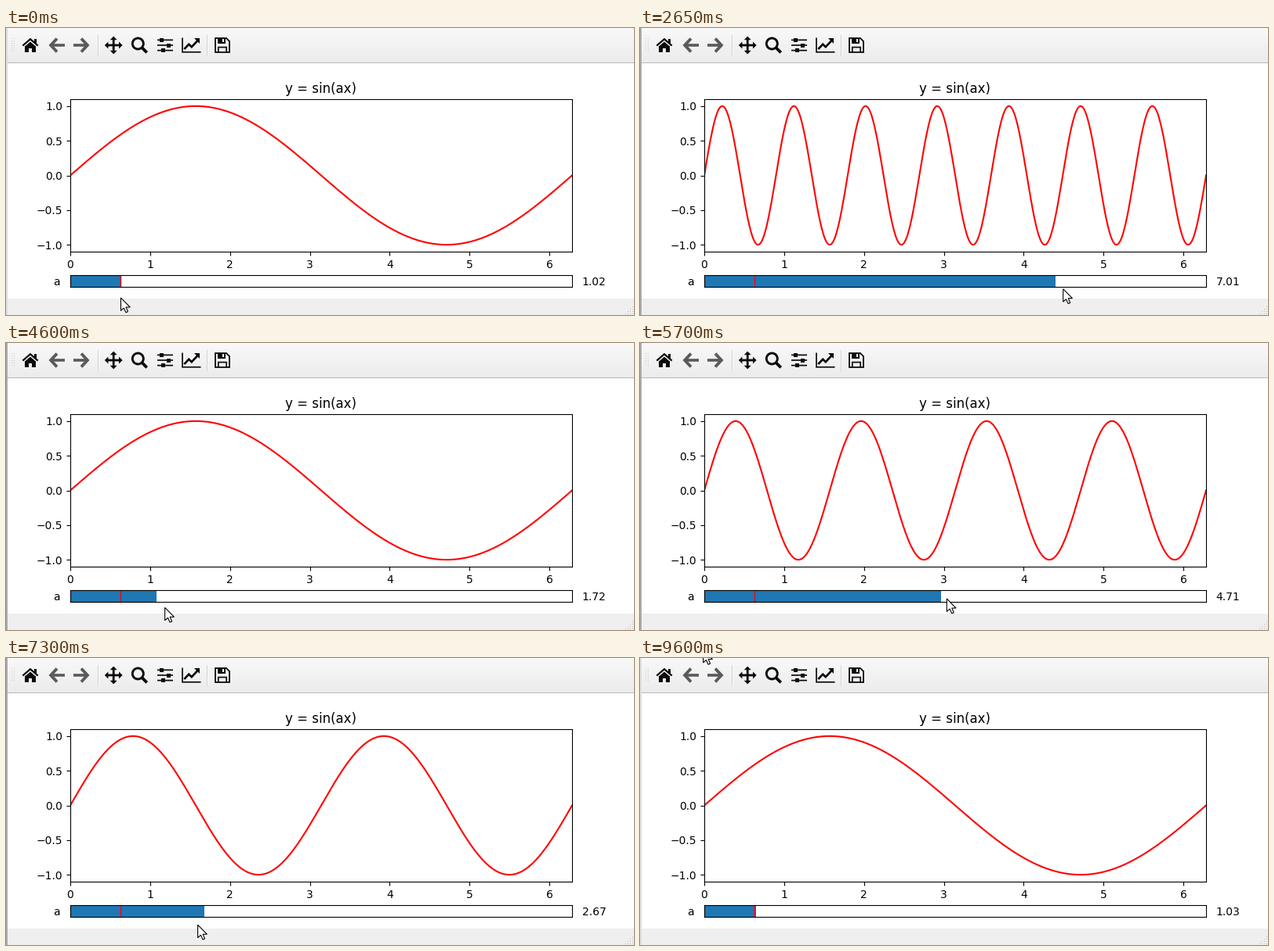
A matplotlib script that plays this animation: 801 px wide and 367 px high, repeating every 9700 ms.

```python
import math

import numpy as np
import matplotlib.pyplot as plt
from matplotlib.animation import FuncAnimation
from matplotlib.patches import Circle, Polygon, Rectangle

W, H, DPI = 801, 367, 100
STEP, LOOP = 50, 9700
PX = 72 / DPI  # points per pixel
INK, DIM = "#0a0a0a", "#5a5a5a"
LEFT, UNIT = 82, 64  # slider origin and pixels per unit of a

plt.rcParams["font.family"] = "DejaVu Sans"
fig = plt.figure(figsize=(W / DPI, H / DPI), dpi=DPI, facecolor="white")


def pixel_axes(zorder):
    """Axes over the whole window, in pixels with y pointing down."""
    ax = fig.add_axes([0, 0, 1, 1], zorder=zorder)
    ax.set(xlim=(0, W), ylim=(H, 0))
    ax.axis("off")
    ax.set_autoscale_on(False)
    return ax


def box_axes(bottom, height):
    return fig.add_axes([LEFT / W, bottom / H, 10 * UNIT / W, height / H])


back = pixel_axes(-1)
front = pixel_axes(10)


def rect(x, y, w, h, color=INK):
    return back.add_patch(Rectangle((x, y), w, h, fc=color, lw=0))


def line(points, width, color=INK):
    x, y = zip(*points)
    back.plot(x, y, color=color, lw=width * PX, solid_capstyle="butt",
              solid_joinstyle="miter", snap=False)


def poly(points, color=INK):
    back.add_patch(Polygon(points, fc=color, lw=0))


# --- window frame -----------------------------------------------------------
shade = np.linspace(0.975, 0.925, 44)[:, None, None] * np.ones((1, 1, 3))
back.imshow(shade, extent=(0, W, 44, 0), aspect="auto",
            interpolation="nearest", zorder=0)
back.set(xlim=(0, W), ylim=(H, 0))
rect(0, 44, W, 1, "#b8b8b8")
rect(0, 346, W, 21, "#efefef")
border = rect(0, 0, 2, H)

for i in range(12):
    rect(7 + 3 * (i % 2), 13 + 3 * (i // 2), 1, 1, "#c4c4c4")
for x in (117, 256):
    rect(x, 9, 1, 27, "#d2d2d2")
    rect(x + 1, 9, 1, 27, "#fafafa")
for row in range(4):
    for col in range(row + 1):
        rect(799 - 3 * col, 356 + 3 * row, 1, 1, "#b8b8b8")

# --- toolbar icons, centred on one row --------------------------------------
MID = 22


def home(x):
    line([(x - 9.7, 22.6), (x, 14.2), (x + 9.7, 22.6)], 2.2)
    rect(x + 5, 13.5, 2.6, 6)
    poly([(x - 6.7, 23.4), (x, 17.6), (x + 6.7, 23.4)])
    for side in (x - 6.7, x + 2):
        rect(side, 23.2, 4.7, 7.8)
    rect(x - 3, 22.5, 6, 3)


def arrow(tip, way):
    wing = tip + way * 10.5
    line([(wing, MID - 8.5), (tip + way * 2.6, MID), (wing, MID + 8.5)], 3.8, DIM)
    line([(tip + way * 3, MID), (tip + way * 20.5, MID)], 3.6, DIM)


def move(x):
    for k in range(4):
        c, s = round(math.cos(k * math.pi / 2)), round(math.sin(k * math.pi / 2))
        line([(x, MID), (x + 8 * c, MID + 8 * s)], 2.8)
        poly([(x + r * c - w * s, MID + r * s + w * c)
              for r, w in ((11.4, 0), (6.8, 4.5), (6.8, -4.5))])


def zoom(x):
    back.add_patch(Circle((x, 20), 7, fill=False, ec=INK, lw=2.9 * PX))
    line([(x + 4.7, 24.7), (x + 11.4, 31.4)], 3.8)


def sliders(x):
    for k, knob in enumerate((-4.2, 4.2, -2.5)):
        y = MID + 6.65 * (k - 1)
        line([(x - 10, y), (x + 10, y)], 1.7)
        rect(x + knob - 2.4, y - 2.5, 4.8, 5)


def chart(x):
    line([(x, 12.5), (x, 30.8), (x + 23.5, 30.8)], 1.7)
    line([(x + 2.3, 27), (x + 8.2, 20.8), (x + 11.8, 24.2), (x + 19.5, 16)], 2.7)
    poly([(x + 15.3, 13.2), (x + 21.8, 13.2), (x + 21.8, 19.7)])


def save(x):
    line([(x, MID), (x, 13), (x + 14, 13), (x + 18, 17), (x + 18, 31), (x, 31),
          (x, MID)], 1.8)
    rect(x + 3, 13, 9.5, 6.5)
    rect(x + 8.5, 14.2, 2.2, 4, "#f0f0f0")
    line([(x + 3.8, 31), (x + 3.8, 24.6), (x + 14.2, 24.6), (x + 14.2, 31)], 1.7)


home(31)
arrow(54.5, 1)
arrow(106.5, -1)
move(137.2)
zoom(168.3)
sliders(203)
chart(225)
save(267)

# --- plot -------------------------------------------------------------------
plot = box_axes(81, 195)
xs = np.linspace(0, 2 * np.pi, 600)
curve, = plot.plot(xs, np.sin(xs), "r", lw=1.5)
plot.set(xlim=(0, 2 * np.pi), ylim=(-1.1, 1.1), xticks=range(7),
         yticks=np.arange(-1, 1.1, 0.5))
plot.set_title("y = sin(ax)")

# --- slider -----------------------------------------------------------------
slider = box_axes(36, 15)
slider.set(xlim=(0, 10), ylim=(0, 1), xticks=[], yticks=[])
fill = slider.add_patch(Rectangle((0, 0), 1, 1, fc="C0", lw=0))
slider.axvline(1, color="r", lw=1)
label = dict(transform=slider.transAxes, va="center")
slider.text(-0.02, 0.43, "a", ha="right", **label)
value = slider.text(1.02, 0.43, "", **label)

# --- mouse pointer ----------------------------------------------------------
ARROW = np.array([(0, 0), (0, 16.5), (3.8, 13), (6.4, 18.8), (9, 17.7),
                  (6.5, 12), (11.8, 12)])
pointer = front.add_patch(Polygon(ARROW, fc="white", ec="black", lw=1.1 * PX))

# --- motion -----------------------------------------------------------------
LAG = 45  # ms by which the slider trails the mouse
FOCUS, BLUR = 900, 9600
LEAVE, GONE = 8800, 9250

# Hand movements: start ms, end ms, slider value and pointer height reached.
MOVES = [
    (300, 500, 1.02, 330), (650, 750, 1.02, 324), (900, 1200, 1.03, 324),
    (1350, 3000, 8.01, 335), (3100, 4350, 1.1, 344), (4450, 5150, 3.48, 327),
    (5300, 6650, 6.95, 327), (6700, 7300, 2.67, 342), (7300, 8050, 1.1, 332),
    (8200, 8350, 1.03, 332),
]


def hand(t):
    """Slider value and pointer height, each movement easing out gently."""
    a, y = 1.02, 345
    for start, end, to_a, to_y in MOVES:
        u = min(max((t - start) / (end - start), 0), 1)
        k = 1 - (1 - u) ** 1.25
        a, y = a + (to_a - a) * k, y + (to_y - y) * k
    return a, y


def mouse(t):
    a, y = hand(t + LAG)
    u = min(max((t - LEAVE) / (GONE - LEAVE), 0), 1)
    swing = 50 * math.sin(2 * math.pi * u)
    return LEFT + UNIT * a - 0.8 - 66.5 * u + swing, y - 342.5 * u ** 2


def draw(n):
    t = n * STEP
    a, _ = hand(t)
    curve.set_ydata(np.sin(int(a) * xs))
    fill.set_width(a)
    value.set_text(f"{a:.2f}")
    pointer.set_xy(ARROW + mouse(t))
    border.set_facecolor("#a9a9a9" if FOCUS <= t < BLUR else "#dcdcdc")
    return curve, fill, value, pointer, border


anim = FuncAnimation(fig, draw, frames=LOOP // STEP, interval=STEP,
                     repeat=True, repeat_delay=0)
plt.show()
```
